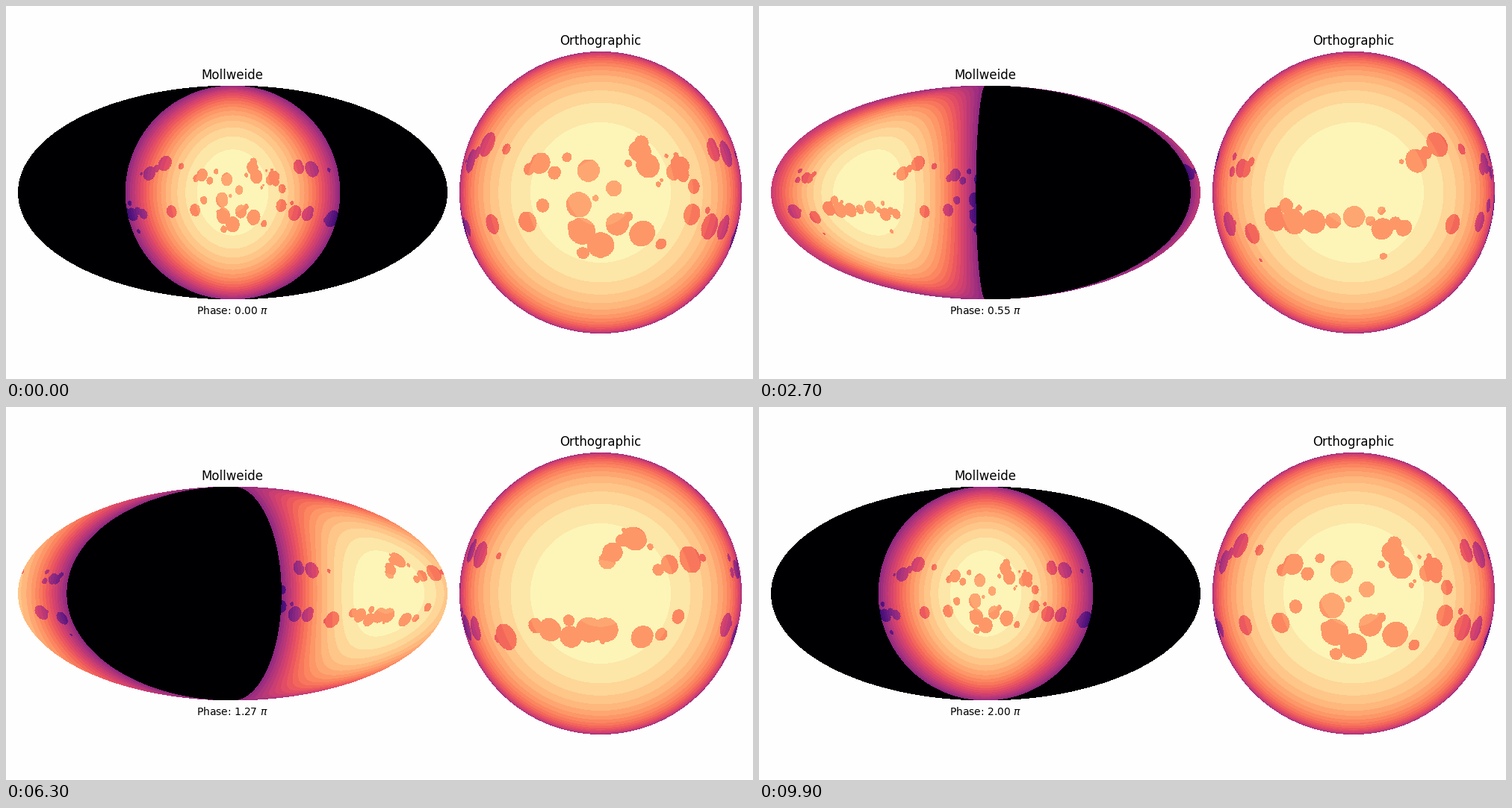
These frames come from a looping animation (1000 px wide and 500 px high, 10000 ms). A matplotlib script:

```python
import numpy as np
import matplotlib.pyplot as plt
from matplotlib.animation import FuncAnimation

W, H, FRAMES = 1000, 500, 100
CELL = 0.2       # degrees per cell of the surface map
DIMMING = 0.195  # brightness lost inside a spot
BAND = 0.0335    # brightness step between neighbouring colours

# Main spots (longitude, latitude) of each belt, from large to small
NORTH = [(172, 14), (68, 16), (-59, 20), (146, 23), (20, 11), (-71, 13),
         (17, 17), (-5, 9), (-26, 12), (57, 17), (136, 17), (161, 12),
         (-152, 10), (36, 11)]
SOUTH = [(86, -18), (-8, -16), (0, -22), (18, -17), (53, -14), (126, -15),
         (-124, -12), (-9, -5), (133, -15), (-163, -13), (-133, -11),
         (-115, -12), (109, -15), (149, -18), (7, -13), (64, -15), (118, -18),
         (-86, -15), (-98, -10), (41, -9), (-147, -17), (-32, -12), (-52, -13)]

magma = plt.get_cmap("magma")


def grow_belt(rng, main, smallest, extra):
    """Main spots, then small companions scattered around them."""
    main = np.array(main, float)
    parents = main[rng.integers(len(main), size=extra)]
    around = parents + rng.normal(0, (7, 4), (extra, 2))
    radii = np.r_[np.linspace(5.7, smallest, len(main)),
                  np.linspace(3.5, 0.8, extra)]
    return np.radians(np.c_[np.r_[main, around], radii])


def spot_map():
    rng = np.random.default_rng(4)
    lon = np.radians(np.arange(-180, 180, CELL) + CELL / 2)
    lat = np.radians(np.arange(-90, 90, CELL) + CELL / 2)
    spots = np.zeros((lat.size, lon.size), bool)
    belts = grow_belt(rng, NORTH, 3.7, 36), grow_belt(rng, SOUTH, 4.2, 40)
    for lon0, lat0, radius in np.concatenate(belts):
        rows = np.abs(lat - lat0) < radius
        near = lat[rows][:, None]
        dist = (np.sin(near) * np.sin(lat0)
                + np.cos(near) * np.cos(lat0) * np.cos(lon - lon0))
        spots[rows] |= dist > np.cos(radius)
    return spots


def is_spot(lon, lat):
    row = ((np.degrees(lat) + 90) / CELL).astype(int)
    col = ((np.degrees(lon) + 180) % 360 / CELL).astype(int)
    return SPOTS[row.clip(0, SPOTS.shape[0] - 1),
                 col.clip(0, SPOTS.shape[1] - 1)]


def shade(mu, spotted):
    """Quadratic limb darkening, posterised into even brightness bands."""
    dim = 1 - mu
    loss = 0.2 * dim + 0.4 * dim ** 2 + DIMMING * spotted
    return magma(1 - (np.floor(loss / BAND) + 0.5) * BAND)[:, :3]


SPOTS = spot_map()
px, py = np.meshgrid(np.arange(W) + 0.5, np.arange(H) + 0.5)

# Mollweide: the surface is fixed, the visible half moves over it
u, v = (px - 303.5) / 287.5, (250 - py) / 143.5
moll = u ** 2 + v ** 2 < 1
theta = np.arcsin(v[moll])
m_lat = np.arcsin((2 * theta + np.sin(2 * theta)) / np.pi)
m_lon = np.pi * u[moll] / np.cos(theta)
m_spot = is_spot(m_lon, m_lat)

# Orthographic: the disc is fixed, the surface turns
u, v = (px - 796) / 189, (250 - py) / 189
disc = u ** 2 + v ** 2 < 1
o_lat = np.arcsin(v[disc])
o_lon = np.arcsin((u[disc] / np.cos(o_lat)).clip(-1, 1))
o_mu = np.sqrt(1 - u[disc] ** 2 - v[disc] ** 2)


def render(phase):
    img = np.full((H, W, 3), 254 / 255)
    mu = np.cos(m_lat) * np.cos(m_lon + phase)
    seen = mu > 0
    colors = np.tile(magma(0)[:3], (mu.size, 1))
    colors[seen] = shade(mu[seen], m_spot[seen])
    img[moll] = colors
    img[disc] = shade(o_mu, is_spot(o_lon - phase, o_lat))
    return img


plt.rcParams["font.family"] = "DejaVu Sans"
fig = plt.figure(figsize=(W / 100, H / 100), dpi=100)
ax = fig.add_axes([0, 0, 1, 1])
ax.axis("off")
picture = ax.imshow(render(0), extent=(0, W, H, 0), interpolation="nearest",
                    aspect="auto")
ax.text(303, 98.4, "Mollweide", fontsize=12, ha="center", va="baseline")
ax.text(796, 52.4, "Orthographic", fontsize=12, ha="center", va="baseline")
label = ax.text(303, 413, "", fontsize=10, ha="center", va="baseline")


def update(i):
    turn = 2 * i / (FRAMES - 1)
    picture.set_data(render(turn * np.pi))
    label.set_text(rf"Phase: {turn:.2f} $\pi$")
    return picture, label


anim = FuncAnimation(fig, update, frames=FRAMES, interval=100, repeat=True)
plt.show()
```
